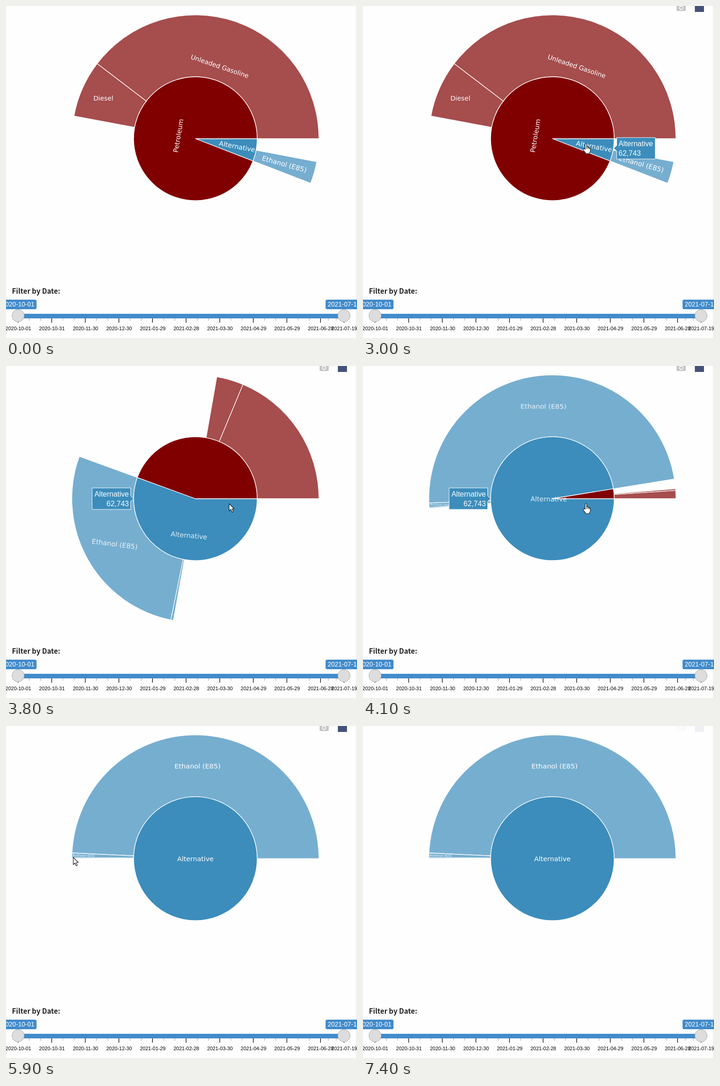
Write an HTML page that moves like this. It is 770x727 px and loops after 7.6 s.

```html
<!DOCTYPE html>
<html lang="en">
<head>
<meta charset="utf-8">
<title>Fuel sunburst</title>
<style>
html, body { margin: 0; width: 100%; height: 100%; overflow: hidden; background: #fefefe; }
svg { display: block; width: 770px; height: 727px; }
#sectors path { stroke: #fff; stroke-width: 1.3; stroke-linejoin: round; }
#names text { font: 14.6px "DejaVu Sans", Verdana, sans-serif; fill: #fff; text-anchor: middle; }
#tip path { stroke: #fff; }
#tip text { font: 16px "Liberation Sans", Arial, sans-serif; fill: #fff; }
#slider text { font: 14px "Liberation Sans", Arial, sans-serif; fill: #fff; text-anchor: middle; }
#slider .day { font-size: 11px; fill: #000; }
.title { font: bold 15.4px "Noto Sans CJK JP", "Noto Sans CJK SC", "Open Sans", sans-serif; fill: #222; }
#cursor path { fill: #fff; stroke: #111; stroke-width: 1.1; stroke-linejoin: round; }
</style>
</head>
<body>
<svg viewBox="0 0 770 727">
  <rect width="770" height="727" fill="#fefefe"/>
  <path d="M768.5 0V727" stroke="#e2e2e6"/>
  <g id="sectors"></g>
  <g id="names"></g>
  <g id="bar">
    <path d="M688 -2H694L696 -5H700L702 -2H708V9.5Q708 11 706.5 11H689.5Q688 11 688 9.5Z" fill="#c6c6c6"/>
    <circle cx="698" cy="4" r="4.6" fill="#fefefe"/>
    <circle cx="698" cy="4" r="2.8" fill="#c6c6c6"/>
    <rect x="728" y="-7" width="20" height="20" fill="#445279"/>
  </g>
  <g id="tip"><path/><text/><text/></g>
  <text class="title" x="13" y="630">Filter by Date:</text>
  <g id="slider"></g>
  <g id="cursor">
    <path id="arrow" d="M.5 .5V16.5L4.2 13L7 19.2L9.6 18.1L6.9 12H11.6Z"/>
    <path id="hand" d="M-1.7 13V2Q-1.7 .5 0 .5T1.7 2V7.5Q4.4 6.6 4.9 8.6Q7.4 7.9 7.8 9.7Q10 9.4 10 11.6V15Q10 18 8 20V22.3H-1V20.5Q-3.6 18 -5.6 14Q-6.4 12 -4.8 11.4Q-3.4 11 -1.7 13ZM1.7 8V12M4.9 9V12.5M7.8 10V13"/>
  </g>
</svg>
<script>
const LOOP = 7600, CX = 415.5, CY = 290.5, R = 135.5, SPLIT = 338.9;
const RED = '#800000', BLUE = '#3c8dbc', PALE_RED = '#a64d4d', PALE_BLUE = '#76aed0';
const $ = id => document.getElementById(id);

function add(parent, tag, attrs, text) {
  const el = document.createElementNS('http://www.w3.org/2000/svg', tag);
  set(el, attrs);
  if (text) el.textContent = text;
  parent.appendChild(el);
  return el;
}
function set(el, attrs) {
  for (const k in attrs) el.setAttribute(k, attrs[k]);
}
const show = (el, on) => el.setAttribute('visibility', on ? 'visible' : 'hidden');

// angles run counter-clockwise in degrees from the right
function polar(r, deg) {
  const a = deg * Math.PI / 180;
  return [CX + r * Math.cos(a), CY - r * Math.sin(a)];
}
function sector(r0, r1, a0, a1) {
  if (a1 - a0 < 0.01) return '';
  if (a1 - a0 > 359.9) return `M${CX + r1} ${CY}a${r1} ${r1} 0 1 0 ${-2 * r1} 0a${r1} ${r1} 0 1 0 ${2 * r1} 0Z`;
  const big = a1 - a0 > 180 ? 1 : 0;
  const inner = r0 ? `L${polar(r0, a1)}A${r0} ${r0} 0 ${big} 1 ${polar(r0, a0)}` : `L${CX} ${CY}`;
  return `M${polar(r1, a0)}A${r1} ${r1} 0 ${big} 0 ${polar(r1, a1)}${inner}Z`;
}

const slice = fill => add($('sectors'), 'path', { fill });
const unleaded = slice(PALE_RED), diesel = slice(PALE_RED);
const ethanol = slice(PALE_BLUE), bio = slice(PALE_BLUE), rest = slice(PALE_BLUE);
const alt = slice(BLUE), petro = slice(RED);

const name = text => add($('names'), 'text', { dy: '.36em' }, text);
function place(el, x, y, rot) {
  el.setAttribute('transform', `translate(${x} ${y}) rotate(${rot})`);
}
const redNames = [
  ['Petroleum', 378, 284, -80.5],
  ['Unleaded Gasoline', 469, 132, 18.7],
  ['Diesel', 213.5, 201.5, 0]
].map(([text, x, y, rot]) => {
  const el = name(text);
  place(el, x, y, rot);
  return el;
});
redNames[1].style.fontSize = redNames[2].style.fontSize = '14.2px';
const altName = name('Alternative'), ethName = name('Ethanol (E85)'), bioName = name('BioDiesel (B20)');
ethName.style.fontSize = '14.9px';

function drawChart(u) {
  const p = SPLIT * (1 - u), half = (360 - p) / 2;
  const e = p + half * 0.9853, b = p + half * 0.9975;
  const outer = (el, a0, a1) => el.setAttribute('d', sector(R, 2 * R, a0, a1));
  outer(unleaded, 0, p * 0.421);
  outer(diesel, p * 0.421, p / 2);
  outer(ethanol, p, e);
  outer(bio, e, b);
  outer(rest, b, p + half);
  petro.setAttribute('d', sector(0, R, 0, p));
  alt.setAttribute('d', sector(0, R, p, 360));

  redNames.forEach(el => show(el, u === 0));
  place(altName, ...polar(93 * (1 - u ** 3.3), (p + 360) / 2), 10.6 * (1 - u));
  place(ethName, ...polar(203, (p + e) / 2), 15.6 * (1 - u));
  place(bioName, ...polar(245 + 27 * (1 - u), (e + b) / 2), 1.5 * u);
  bioName.style.fontSize = 6.3 * u ** 1.8 + 'px';
  show(bioName, u > 0.3);
  $('names').setAttribute('opacity', u > 0 && u < 1 ? 0.85 : 1);
}

// from, to, name, value, fill, anchor x, y, side
const tips = [
  [1100, 1900, 'Diesel', '158,511', RED, 163, 201.5, -1],
  [2000, 2700, 'Petroleum', '1,001,386', RED, 281, 265, -1],
  [2900, 3400, 'Alternative', '62,743', BLUE, 550, 311.5, 1],
  [3600, 4900, 'Alternative', '62,743', BLUE, 280, 290.5, -1],
  [5000, 5600, 'Ethanol (E85)', '61,821', PALE_BLUE, 488, 86.5, 1],
  [6100, 7000, 'BioDiesel (B20)', '766', PALE_BLUE, 145, 284, -1]
];
const [tipBox, tipName, tipValue] = $('tip').children;

function drawTip(t) {
  const tip = tips.find(k => t >= k[0] && t < k[1]);
  show($('tip'), tip);
  if (!tip) return;
  const [, , text, value, fill, x, y, side] = tip;
  const anchor = side < 0 ? 'end' : 'start', tx = x + side * 10.5;
  tipName.textContent = text;
  tipValue.textContent = value;
  set(tipName, { x: tx, y: y - 4.5, 'text-anchor': anchor });
  set(tipValue, { x: tx, y: y + 16.5, 'text-anchor': anchor });
  const w = Math.max(tipName.getComputedTextLength(), tipValue.getComputedTextLength()) + 9;
  set(tipBox, { fill, d: `M${x} ${y}l${side * 6.5} -6v-17.5h${side * w}v47h${-side * w}v-17.5Z` });
}

// time, x, y, hand
const moves = [
  [700, 31, 120, 0], [1100, 196, 196, 1], [1200, 208, 205, 1], [1600, 208, 205, 1],
  [1700, 214, 217, 0], [2000, 374, 313, 1], [2100, 374, 313, 1], [2200, 381, 311, 0],
  [2300, 387, 311, 1], [2400, 387, 311, 1], [2500, 395, 310, 0], [2900, 484, 302, 1],
  [3000, 489, 301, 1], [3600, 489, 301, 0], [4000, 489, 301, 1], [4400, 489, 301, 1],
  [4500, 425, 264, 0], [4700, 303, 190, 1], [4800, 303, 190, 1], [4900, 230, 222, 0],
  [5000, 151, 262, 1], [5300, 151, 262, 1], [5400, 151, 265, 0], [5900, 147, 287, 0],
  [6000, 147, 287, 0], [6100, 147, 285, 1], [6800, 147, 285, 1], [6900, 135, 260, 0],
  [7200, 60, 120, 0]
];
function drawCursor(t) {
  const on = t >= 700 && t < 7200;
  show($('arrow'), false);
  show($('hand'), false);
  if (!on) return;
  const i = moves.findIndex(m => m[0] > t) - 1;
  const [t0, x0, y0, hand] = moves[i], [t1, x1, y1] = moves[i + 1];
  const k = (t - t0) / (t1 - t0);
  $('cursor').setAttribute('transform', `translate(${x0 + (x1 - x0) * k} ${y0 + (y1 - y0) * k})`);
  show($(hand ? 'hand' : 'arrow'), true);
}

function buildSlider() {
  const g = $('slider'), x0 = 26.5, x1 = 741.5, step = (x1 - x0) * 30 / 291;
  const tick = (x, major) => add(g, 'path', {
    d: `M${x} 684V${major ? 693.5 : 689}`, stroke: major ? '#000' : '#999', 'stroke-width': major ? 1.3 : 1
  });
  const day = (x, n) => {
    const date = new Date(Date.UTC(2020, 9, 1 + n)).toISOString().slice(0, 10);
    add(g, 'text', { class: 'day', x, y: 710 }, date);
    return date;
  };
  for (let i = 0; i < 10; i++) {
    const x = x0 + i * step, gap = (Math.min(x + step, x1) - x) / 3;
    tick(x, true);
    tick(x + gap);
    tick(x + 2 * gap);
    day(x + 0.5, i * 30);
  }
  tick(x1, true);
  day(x1 + 0.5, 291);
  add(g, 'rect', { x: x0, y: 674, width: x1 - x0, height: 10, fill: '#428bca' });
  [[x0, '2020-10-01'], [x1, '2021-07-19']].forEach(([x, date]) => {
    add(g, 'rect', { x: x - 40.5, y: 643, width: 81, height: 21, rx: 3.5, fill: '#428bca' });
    add(g, 'text', { x, y: 658 }, date);
    add(g, 'circle', { cx: x, cy: 678, r: 13.5, fill: '#ddd', stroke: '#aaa' });
  });
}

function zoom(t) {
  if (t < 3400) return 0;
  if (t < 3600) return 0.083;
  return Math.min(1, 0.231 + (t - 3600) * 0.001484);
}
function barOpacity(t) {
  if (t < 700) return 0;
  if (t < 7100) return Math.min(1, (t - 650) / 300);
  return Math.max(0.08, 1 - (t - 7050) / 300);
}

let last = -1;
function frame(now) {
  const t = Math.floor(now % LOOP / 100) * 100;
  if (t !== last) {
    last = t;
    drawChart(zoom(t));
    drawTip(t);
    drawCursor(t);
    $('bar').setAttribute('opacity', barOpacity(t));
  }
}
buildSlider();
const start = performance.now();
frame(0);
requestAnimationFrame(function run() {
  frame(performance.now() - start);
  requestAnimationFrame(run);
});
</script>
</body>
</html>
```
